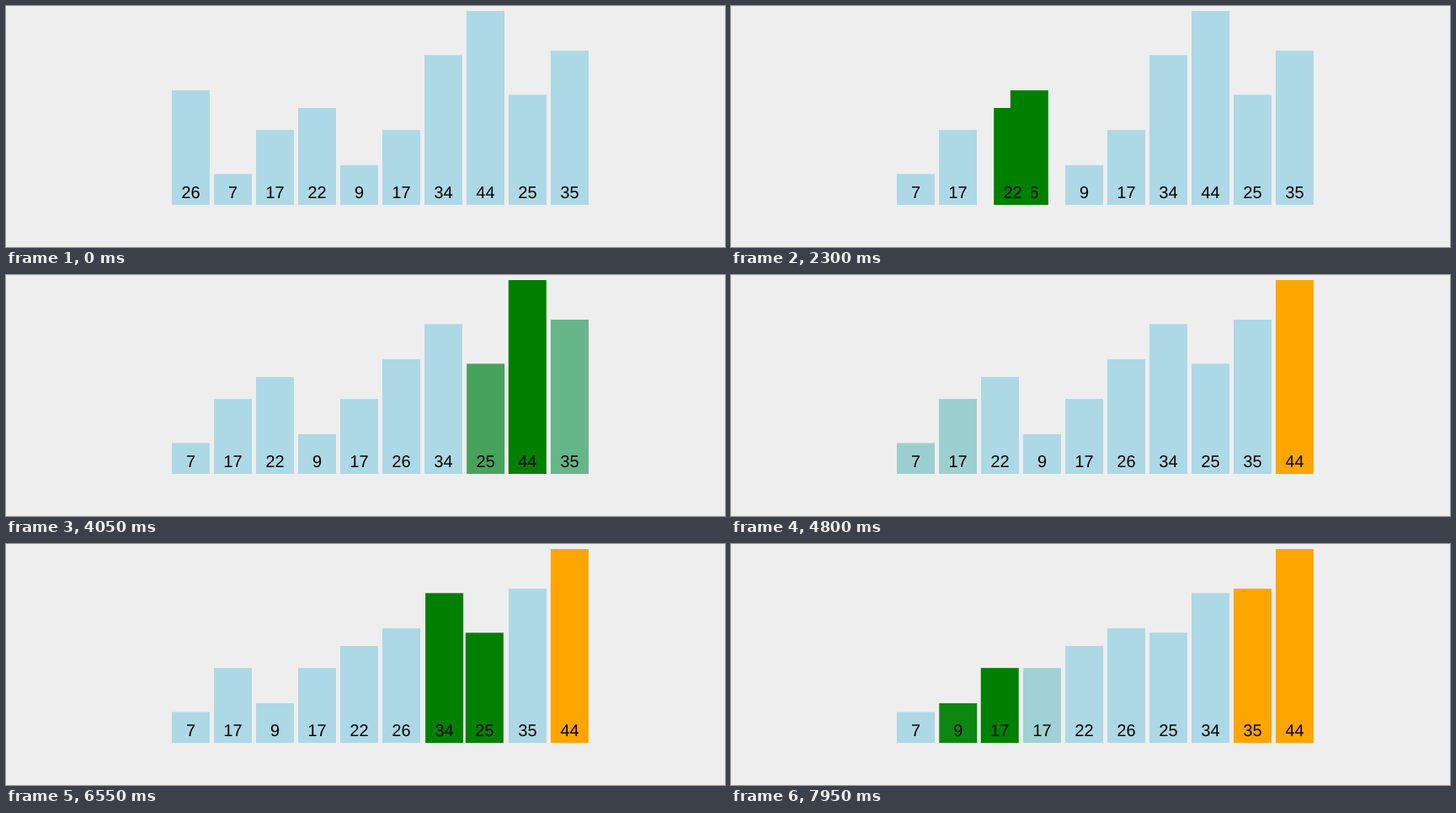
A matplotlib script for the animation above (8000 ms loop, 854 by 286 pixels).

```python
import numpy as np
import matplotlib.pyplot as plt
from matplotlib.animation import FuncAnimation
from matplotlib.patches import PathPatch, Rectangle
from matplotlib.textpath import TextPath
from matplotlib.transforms import Affine2D

W, H, DPI = 854, 286, 64
FRAMES, INTERVAL = 160, 50

VALUES = [26, 7, 17, 22, 9, 17, 34, 44, 25, 35]
LEFT, PITCH, BAR_W = 197, 50, 45
FLOOR, BASELINE = 50, 58
UNIT = 230 / 44
FONT_SIZE = 20
DIGIT_W = 0.556 * FONT_SIZE

BLUE, GREEN, ORANGE = (173, 216, 230), (0, 128, 0), (255, 165, 0)

# A tween lasts slightly longer than a step, so the next step takes it over.
START, STEP, TWEEN = 1186, 197.2, 222


def ease(t):
    t = min(max(t, 0), 1)
    return 4 * t ** 3 if t < 0.5 else 1 - 4 * (1 - t) ** 3


def snapshot(order, lit=(), done=()):
    """Rows of x, r, g, b for each bar when the given slots are marked."""
    rows = np.zeros((len(VALUES), 4))
    for slot, bar in enumerate(order):
        color = GREEN if slot in lit else ORANGE if slot in done else BLUE
        rows[bar] = (LEFT + PITCH * slot, *color)
    return rows


def bubble_sort(passes):
    order, done = list(range(len(VALUES))), []
    yield snapshot(order)
    for last in range(len(order) - 1, len(order) - 1 - passes, -1):
        for j in range(last):
            pair = (j, j + 1)
            yield snapshot(order, pair, done)
            swapped = VALUES[order[j]] > VALUES[order[j + 1]]
            if swapped:
                order[j], order[j + 1] = order[j + 1], order[j]
                yield snapshot(order, pair, done)
        # Without a final swap the last pair stays lit for one more step.
        if not swapped:
            yield snapshot(order, pair, done)
        done.append(last)
        yield snapshot(order, (), done)
        if swapped:
            yield snapshot(order, (), done)


first, *targets = bubble_sort(3)
starts = [first]
for target in targets:
    starts.append(starts[-1] + (target - starts[-1]) * ease(STEP / TWEEN))


def pose(ms):
    if ms < START:
        return first
    k = int((ms - START) // STEP)
    progress = ease((ms - START - k * STEP) / TWEEN)
    return starts[k] + (targets[k] - starts[k]) * progress


fig = plt.figure(figsize=(W / DPI, H / DPI), dpi=DPI, facecolor="#eeeeee")
ax = fig.add_axes([0, 0, 1, 1])
ax.set(xlim=(0, W), ylim=(0, H))
ax.axis("off")

bars, labels = [], []
for i, value in enumerate(VALUES):
    bar = Rectangle((0, FLOOR), BAR_W, value * UNIT, lw=0, snap=False, zorder=2 * i + 1)
    text = str(value)
    glyphs = TextPath(((BAR_W - DIGIT_W * len(text)) / 2, BASELINE), text,
                      size=FONT_SIZE, prop={"family": "Liberation Sans"})
    label = PathPatch(glyphs, fc="black", lw=0, snap=False, zorder=2 * i + 2)
    bars.append(ax.add_patch(bar))
    labels.append(ax.add_patch(label))


def draw(frame):
    for bar, label, (x, *rgb) in zip(bars, labels, pose(frame * INTERVAL)):
        shift = Affine2D().translate(x, 0) + ax.transData
        bar.set_transform(shift)
        label.set_transform(shift)
        bar.set_facecolor(np.round(rgb) / 255)
    return bars + labels


anim = FuncAnimation(fig, draw, frames=FRAMES, interval=INTERVAL,
                     repeat=True, repeat_delay=0, blit=False)
plt.show()
```
